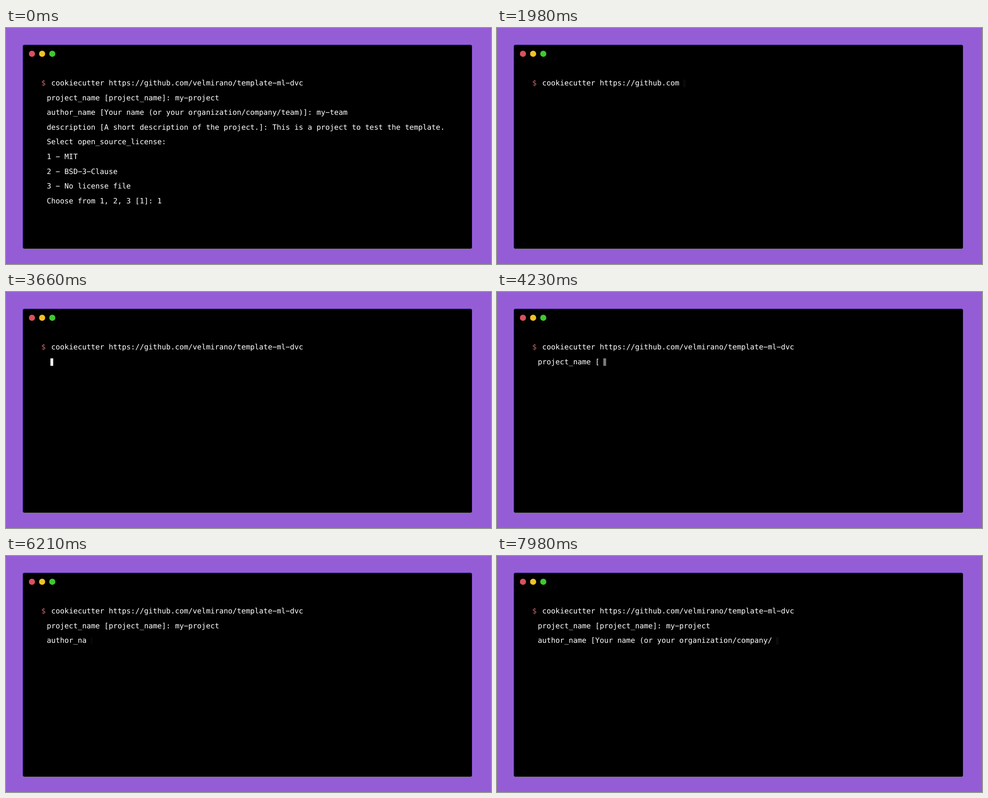
An HTML page that plays this animation: 1073 by 522 pixels, repeating every 8 s.

```html
<!DOCTYPE html>
<html lang="en">
<head>
<meta charset="utf-8">
<title>Terminal</title>
<style>
  html, body { margin: 0; width: 100%; height: 100%; overflow: hidden; background: #4d3a66; }
  svg { display: block; }
  text { font: 16.25px "DejaVu Sans Mono", monospace; fill: #fff; text-rendering: geometricPrecision; white-space: pre; }
  #prompt { fill: #bd6a6a; }
</style>
</head>
<body>
<svg id="stage" width="1073" height="522" viewBox="0 0 1073 522">
  <rect width="1073" height="522" rx="2" fill="#945dd6"/>
  <rect x="37" y="38" width="994" height="451" rx="4" fill="#716a7c"/>
  <rect x="37" y="37" width="994" height="451" rx="4" fill="#1c0658"/>
  <rect x="38.5" y="38.5" width="992" height="449.5" rx="3"/>
  <circle cx="57.4" cy="57" r="6.8" fill="#d9515d"/>
  <circle cx="79.9" cy="57" r="6.8" fill="#f4c025"/>
  <circle cx="102.4" cy="57" r="6.8" fill="#3ec930"/>
  <text id="prompt" x="78" y="127.4">$</text>
  <rect id="cursor" width="6.1" height="16.6" fill="#fff"/>
</svg>
<script>
const LOOP = 8000, CLEAR = 210, START = 736;
const TYPE_DELAY = 40, LINE_DELAY = 636, BLINK = 900;
const ADVANCE = 9.783, FIRST_BASELINE = 127.2, LINE_HEIGHT = 32.57;

const lines = [
  "cookiecutter https://github.com/velmirano/template-ml-dvc",
  "project_name [project_name]: my-project",
  "author_name [Your name (or your organization/company/team)]: my-team",
  "description [A short description of the project.]: This is a project to test the template.",
  "Select open_source_license:",
  "1 - MIT",
  "2 - BSD-3-Clause",
  "3 - No license file",
  "Choose from 1, 2, 3 [1]: 1",
].map(s => s.replace(/-/g, "\u2212")); // wide terminal dash

const stage = document.getElementById("stage");
const prompt$ = document.getElementById("prompt");
const cursor = document.getElementById("cursor");
const lineX = i => i ? 90.2 : 100;
const baseline = i => FIRST_BASELINE + i * LINE_HEIGHT;

const rows = lines.map((_, i) => {
  const row = document.createElementNS(stage.namespaceURI, "text");
  row.setAttribute("x", lineX(i));
  row.setAttribute("y", baseline(i));
  return stage.appendChild(row);
});

let next = START;
const starts = lines.map(line => {
  const start = next;
  next += line.length * TYPE_DELAY + LINE_DELAY;
  return start;
});

// CSS "ease": cubic-bezier(.25, .1, .25, 1)
function ease(x) {
  const bezier = (a, b, u) => 3 * a * u * (1 - u) ** 2 + 3 * b * u * u * (1 - u) + u ** 3;
  let low = 0, high = 1;
  for (let i = 0; i < 20; i++) {
    const mid = (low + high) / 2;
    if (bezier(.25, .25, mid) < x) low = mid; else high = mid;
  }
  return bezier(.1, 1, low);
}

function blink(age) {
  const phase = age / BLINK % 1 * 2;
  return phase < 1 ? 1 - ease(phase) : ease(phase - 1);
}

function draw(t) {
  const finished = t < CLEAR;
  const active = starts.filter(s => s <= t).length - 1;
  rows.forEach((row, i) => {
    const count = finished ? Infinity : Math.max(0, Math.floor((t - starts[i]) / TYPE_DELAY));
    row.textContent = lines[i].slice(0, count);
  });
  prompt$.style.opacity = finished || active >= 0 ? 1 : 0;
  cursor.style.opacity = active < 0 ? 0 : blink(t - starts[active]);
  if (active >= 0) {
    cursor.setAttribute("x", lineX(active) + rows[active].textContent.length * ADVANCE + 8.1);
    cursor.setAttribute("y", baseline(active) - 13);
  }
}

function tick() {
  draw(performance.now() % LOOP);
  requestAnimationFrame(tick);
}
tick();
</script>
</body>
</html>
```
